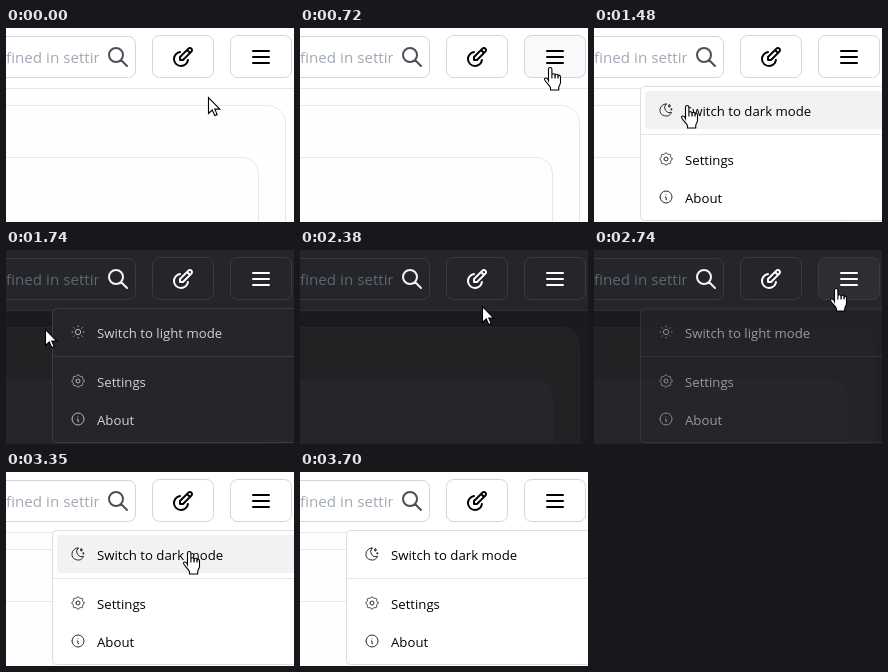
These frames come from a looping animation (288 px wide and 194 px high, 4070 ms). An HTML page with a canvas:

```html
<!DOCTYPE html>
<html lang="en">
<head>
<meta charset="utf-8">
<title>Theme switch menu</title>
<style>
html, body { margin: 0; width: 100%; height: 100%; overflow: hidden; background: #fff; }
canvas { display: block; width: 288px; height: 194px; }
</style>
</head>
<body>
<canvas id="stage" width="288" height="194"></canvas>
<script>
const ctx = document.getElementById('stage').getContext('2d');
const LOOP = 4070;
const FONT = '"Open Sans", "Noto Sans", sans-serif';

const LIGHT = {
  head: '#ffffff', page: '#fefefe', card: '#fefefe', inner: '#fefefe',
  rule: '#e5e7eb', cardLine: '#e5e7eb', border: '#d1d5db', press: '#f8f9fb',
  hint: '#a3a9b3', search: '#4b4f56', icon: '#000000',
  menu: '#ffffff', menuLine: '#dcdee1', divider: '#e5e6e8', hover: '#f1f2f4',
  text: '#000000', small: '#2b2c2e'
};
const DARK = {
  head: '#25262b', page: '#1a1b1e', card: '#212223', inner: '#25262b',
  rule: '#2c2e33', cardLine: '#252629', border: '#393b41', press: '#2c2e33',
  hint: '#63666d', search: '#f4f4f5', icon: '#ffffff',
  menu: '#25262b', menuLine: '#3a3c41', divider: '#3a3c41', hover: '#373a40',
  text: '#d0d1d4', small: '#b4b5b9'
};

const ICONS = {
  search: 'M3 10a7 7 0 1 0 14 0a7 7 0 1 0 -14 0M21 21l-6 -6',
  edit: 'M12 15l8.385 -8.415a2.1 2.1 0 0 0 -2.97 -2.97l-8.415 8.385v3h3zM16 5l3 3' +
    'M9 7.07a7 7 0 0 0 1 13.93a7 7 0 0 0 6.929 -6',
  bars: 'M4 6h16M4 12h16M4 18h16',
  moon: 'M12 3c.132 0 .263 0 .393 0a7.5 7.5 0 0 0 7.92 12.446a9 9 0 1 1 -8.313 -12.454z' +
    'M17 4a2 2 0 0 0 2 2a2 2 0 0 0 -2 2a2 2 0 0 0 -2 -2a2 2 0 0 0 2 -2M19 11h2m-1 -1v2',
  sun: 'M8 12a4 4 0 1 0 8 0a4 4 0 1 0 -8 0M3 12h1m8 -9v1m8 8h1m-9 8v1m-6.4 -15.4l.7 .7' +
    'm12.1 -.7l-.7 .7m0 11.4l.7 .7m-12.1 -.7l-.7 .7',
  info: 'M3 12a9 9 0 1 0 18 0a9 9 0 1 0 -18 0M12 8.5h.01M11 12h1v4h1',
  gear: gearPath()
};
for (const k in ICONS) ICONS[k] = new Path2D(ICONS[k]);

const ARROW = new Path2D('M.5 .5V16.5L4.3 13L6.8 18.6L9.2 17.6L6.8 12.1H11.8z');
const HAND = new Path2D('M4.5 13.5V2.2a1.7 1.7 0 0 1 3.4 0V8c.2 -1.6 3 -1.6 3.2 .2' +
  'c.3 -1.3 2.8 -1.2 3 .5c.4 -1 2.4 -.7 2.4 1.2v5.6c0 2 -1.8 3 -1.8 5.5v2H6.5v-2' +
  'C6.5 18.5 1 15 .6 12.5c-.5 -2 2.6 -2.2 3.9 1z');
const FINGERS = new Path2D('M7.9 8v3.5M11.1 8.2v3.3M14.1 8.7v2.8');

// Pointer tip: time, x, y
const ROUTE = [
  [310, 202, 69], [570, 250, 39], [880, 250, 39], [1220, 205, 57], [1250, 192, 61],
  [1460, 93, 77], [1540, 93, 77], [1740, 39, 79], [2110, 39, 79], [2380, 182, 56],
  [2560, 252, 30], [2680, 252, 30], [2960, 196, 76], [3050, 190, 79],
  [3330, 190, 79], [3690, -24, 86]
];

function gearPath() {
  let d = '';
  for (let i = 0; i < 96; i++) {
    const a = i / 96 * Math.PI * 2, r = 8.4 + .9 * Math.cos(8 * a);
    d += (i ? 'L' : 'M') + (12 + r * Math.cos(a)) + ' ' + (12 + r * Math.sin(a));
  }
  return d + 'zM9 12a3 3 0 1 0 6 0a3 3 0 1 0 -6 0';
}

const ramp = (t, from, span) => Math.min(1, Math.max(0, (t - from) / span));

function pointer(t) {
  let a = ROUTE[0];
  for (const b of ROUTE) {
    if (t < b[0]) {
      const p = ramp(t, a[0], b[0] - a[0] || 1);
      const e = p * .5 + p * p * (3 - 2 * p) * .5;
      return [a[1] + (b[1] - a[1]) * e, a[2] + (b[2] - a[2]) * e];
    }
    a = b;
  }
  return [a[1], a[2]];
}

function menuAlpha(t) {
  if (t < 2080) return ramp(t, 810, 150);
  if (t < 2620) return 1 - ramp(t, 2080, 90);
  return ramp(t, 2640, 150);
}

function box(x, y, w, h, r, fill, line) {
  ctx.beginPath();
  ctx.roundRect(x, y, w, h, r);
  ctx.fillStyle = fill;
  ctx.fill();
  if (line) {
    ctx.strokeStyle = line;
    ctx.lineWidth = 1;
    ctx.stroke();
  }
}

function rect(x, y, w, h, color) {
  ctx.fillStyle = color;
  ctx.fillRect(x, y, w, h);
}

function icon(name, x, y, size, weight, color) {
  ctx.save();
  ctx.translate(x, y);
  ctx.scale(size / 24, size / 24);
  ctx.lineWidth = weight;
  ctx.lineCap = ctx.lineJoin = 'round';
  ctx.strokeStyle = color;
  ctx.stroke(ICONS[name]);
  ctx.restore();
}

function label(text, x, y, size, color) {
  ctx.font = size + 'px ' + FONT;
  ctx.fillStyle = color;
  ctx.fillText(text, x, y);
}

function page(c, pressed) {
  rect(0, 0, 288, 194, c.page);
  box(-100.5, 77.5, 380, 300, 18, c.card, c.cardLine);
  box(-100.5, 129.5, 353, 300, 16, c.inner, c.cardLine);
  rect(0, 0, 288, 60, c.head);
  rect(0, 60, 288, 1, c.rule);

  box(-100.5, 8.5, 230, 41, 7, c.head, c.border);
  ctx.save();
  ctx.beginPath();
  ctx.rect(0, 8, 93, 42);
  ctx.clip();
  ctx.font = '15.2px ' + FONT;
  label('defined in settings', -ctx.measureText('de').width, 35, 15.2, c.hint);
  ctx.restore();
  icon('search', 100, 17, 24, 2, c.search);

  box(146.5, 7.5, 61, 42, 7, c.head, c.border);
  icon('edit', 165, 17, 24, 2, c.icon);
  box(224.5, 7.5, 61, 42, 7, pressed ? c.press : c.head, c.border);
  icon('bars', 243, 17, 24, 2, c.icon);
}

function menu(c, dark, hover) {
  box(46.5, 58.5, 260, 134, 4, c.menu, c.menuLine);
  if (hover) box(51, 63, 250, 38, 4, c.hover);
  rect(47, 106, 241, 1, c.divider);
  const rows = [
    [dark ? 'sun' : 'moon', 'Switch to ' + (dark ? 'light' : 'dark') + ' mode', 88],
    ['gear', 'Settings', 137],
    ['info', 'About', 175]
  ];
  for (const [name, text, y] of rows) {
    icon(name, 64, y - 14, 16, 1.5, c.small);
    label(text, 91, y, 13.2, c.text);
  }
}

function cursor(x, y, hand) {
  ctx.save();
  ctx.translate(Math.round(x) - (hand ? 6 : 0), Math.round(y));
  ctx.fillStyle = '#fff';
  ctx.strokeStyle = '#000';
  ctx.lineWidth = 1.1;
  ctx.lineJoin = 'miter';
  const shape = hand ? HAND : ARROW;
  ctx.fill(shape);
  ctx.stroke(shape);
  if (hand) ctx.stroke(FINGERS);
  ctx.restore();
}

function draw(t) {
  const dark = t >= 1510 && t < 3270;
  const c = dark ? DARK : LIGHT;
  const [x, y] = pointer(t);
  const open = menuAlpha(t);
  const onButton = y > 7 && y < 50 && (x > 224 && x < 286 || x > 146 && x < 208);
  const onItem = open > .5 && x > 51 && y > 63 && y < 101;
  const pressed = onButton && x > 224 && (t >= 720 && t < 2000 || t >= 2620);

  page(c, pressed);
  if (open > 0) {
    ctx.globalAlpha = open;
    menu(c, dark, onItem);
    ctx.globalAlpha = 1;
  }
  cursor(x, y, onButton || onItem);
}

const start = performance.now();
function tick() {
  draw((performance.now() - start) % LOOP);
  requestAnimationFrame(tick);
}
tick();
</script>
</body>
</html>
```
